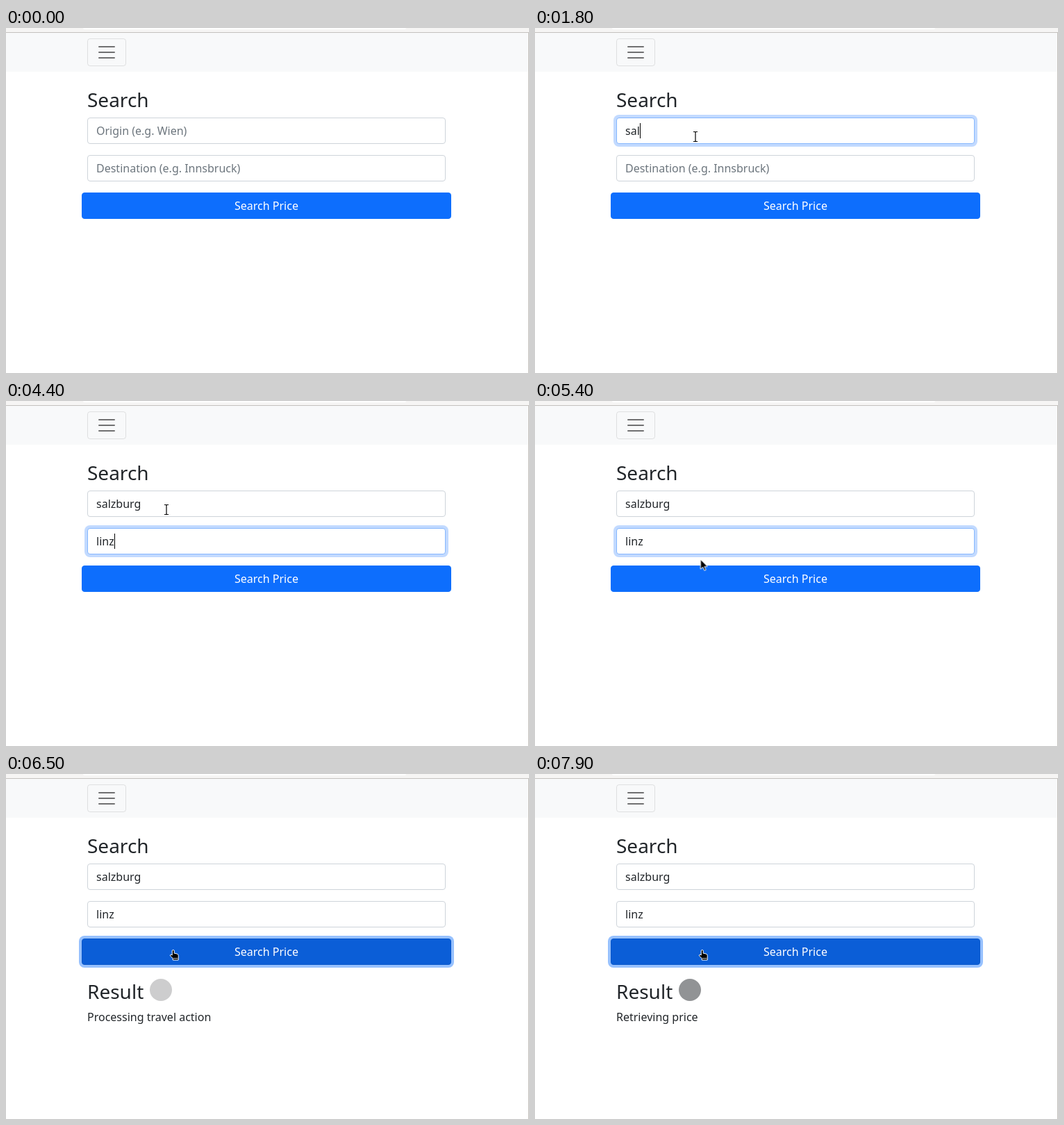
An HTML page that plays this animation: 753x497 px, repeating every 8 s.

```html
<!DOCTYPE html>
<html lang="en">
<head>
<meta charset="utf-8">
<title>Search</title>
<style>
html, body { margin: 0; width: 100%; height: 100%; overflow: hidden; background: #fff; }
body { position: relative; font: 16px/24px "Noto Sans", "Open Sans", sans-serif; color: #212529; }
body > * { position: absolute; box-sizing: border-box; white-space: pre; }

.toolbar { left: 0; top: 0; width: 100%; height: 7px; background: #f6f5f4; border-bottom: 1px solid #c3c0bd; }
.address { left: 111px; top: 0; width: 465px; height: 2px; background: #fff; border-radius: 0 0 4px 4px; }
.navbar { left: 0; top: 7px; width: 100%; height: 56px; background: #f8f9fa; }
.edge { left: 752px; top: 7px; width: 1px; bottom: 0; background: #c3c0bb; }
.toggler { left: 117px; top: 15px; width: 56px; height: 40px; padding: 4px 12px; border: 1px solid rgba(0,0,0,.1); border-radius: 4px; }
.toggler svg { display: block; }

h3 { left: 117px; margin: 0; font-size: 28px; font-weight: 500; line-height: 33.6px; }
.field { left: 117px; width: 516px; height: 38px; padding: 6px 12px; border: 1px solid #ced4da; border-radius: 4px; background: #fff; }
.hint { color: #6c757d; }
.caret { position: absolute; top: 7px; width: 1px; height: 22px; background: #000; }
#from { top: 129px; animation: from 8s ease-in-out infinite; }
#to { top: 183px; animation: to 8s ease-in-out infinite; }
.button { left: 109px; top: 237px; width: 532px; height: 38px; padding: 6px 12px; border: 1px solid #0d6efd; border-radius: 4px;
  background: #0d6efd; color: #fff; text-align: center; animation: press 8s ease-in-out infinite; }
#spinner { left: 207px; top: 295px; width: 32px; height: 32px; border-radius: 50%; background: #212529; }
#status { left: 117px; top: 338px; }
[hidden] { display: none; }

@keyframes from {
  0%, 13.19%, 41.31%, 100% { border-color: #ced4da; box-shadow: 0 0 0 0 rgba(13,110,253,0); }
  15.06%, 39.44% { border-color: #86b7fe; box-shadow: 0 0 0 4px rgba(13,110,253,.25); }
}
@keyframes to {
  0%, 39.44%, 73.13%, 100% { border-color: #ced4da; box-shadow: 0 0 0 0 rgba(13,110,253,0); }
  41.31%, 71.25% { border-color: #86b7fe; box-shadow: 0 0 0 4px rgba(13,110,253,.25); }
}
@keyframes press {
  0%, 68% { background: #0d6efd; border-color: #0d6efd; box-shadow: 0 0 0 0 rgba(49,132,253,0); }
  69.88%, 71.25% { background: #0b5ed7; border-color: #0a58ca; box-shadow: 0 0 0 0 rgba(49,132,253,0); }
  73.13%, 100% { background: #0b5ed7; border-color: #0a58ca; box-shadow: 0 0 0 4px rgba(49,132,253,.5); }
}

.mouse { left: 0; top: 0; width: 1px; height: 1px; overflow: visible; animation: move 8s infinite; }
.mouse g { visibility: hidden; animation: 8s step-end infinite; }
.mouse .hand { animation-name: hand; }
.mouse .arrow { animation-name: arrow; }
.mouse .beam { animation-name: beam; }
@keyframes move {
  0%, 6.3% { transform: translate(149px, 50px); animation-timing-function: ease-out; }
  8.7%, 11% { transform: translate(227px, 162px); animation-timing-function: ease-in-out; }
  13.1%, 61.9% { transform: translate(231px, 156px); animation-timing-function: ease-in-out; }
  70.6%, 100% { transform: translate(241px, 254px); }
}
@keyframes hand {
  0% { visibility: hidden; }
  6.2% { visibility: visible; }
  6.4% { visibility: hidden; }
  68% { visibility: visible; }
}
@keyframes arrow {
  0% { visibility: hidden; }
  6.4% { visibility: visible; }
  7.4% { visibility: hidden; }
  64.1% { visibility: visible; }
  65.2% { visibility: hidden; }
  67.1% { visibility: visible; }
  68% { visibility: hidden; }
}
@keyframes beam {
  0% { visibility: hidden; }
  7.4% { visibility: visible; }
  64.1% { visibility: hidden; }
  65.2% { visibility: visible; }
  67.1% { visibility: hidden; }
}
</style>
</head>
<body>
<div class="toolbar"></div>
<div class="address"></div>
<div class="navbar"></div>
<div class="toggler"><svg width="30" height="30"><path d="M4 7h22M4 15h22M4 23h22" stroke="#000" stroke-opacity=".55" stroke-width="2" stroke-linecap="round"/></svg></div>
<div class="edge"></div>

<h3 style="top:87px">Search</h3>
<div class="field" id="from"><span class="text"></span><i class="caret" hidden></i><span class="hint">Origin (e.g. Wien)</span></div>
<div class="field" id="to"><span class="text"></span><i class="caret" hidden></i><span class="hint">Destination (e.g. Innsbruck)</span></div>
<div class="button">Search Price</div>

<h3 class="result" style="top:297px" hidden>Result</h3>
<div class="result" id="spinner" hidden></div>
<div class="result" id="status" hidden></div>

<svg class="mouse">
  <g class="hand">
    <path d="M-1.8 7V1Q-1.8-.6-.3-.6T1.2 1V4.2L5.2 5Q7.2 5.5 7.2 7.5V14H-.8V11.5L-4.6 8Q-5 6.2-3.2 6.2Z" fill="#000" stroke="#fff"/>
    <path d="M0 11.5H6.5" stroke="#fff" stroke-width=".7"/>
  </g>
  <g class="arrow"><path d="M0 0V14L3.3 11 5.6 16 7.8 15 5.6 10.2H10Z" fill="#000" stroke="#fff"/></g>
  <g class="beam" fill="none">
    <path id="bar" d="M-3-6.5H-1Q0-6.5 0-5.5V6.5Q0 7.5-1 7.5H-3M3-6.5H1Q0-6.5 0-5.5M0 6.5Q0 7.5 1 7.5H3" stroke="#fff" stroke-width="3"/>
    <use href="#bar"/>
    <path d="M-3-6.5H-1Q0-6.5 0-5.5V6.5Q0 7.5-1 7.5H-3M3-6.5H1Q0-6.5 0-5.5M0 6.5Q0 7.5 1 7.5H3" stroke="#000" stroke-width="1.2"/>
  </g>
</svg>

<script>
const LOOP = 8000;
const RESULT_AT = 5836;
const GROW = 375;

const fields = [
  { id: 'from', word: 'salzburg', keys: [1500, 1700, 1800, 2100, 2300, 2600, 2800, 3000], focus: [[1055, 3155]] },
  { id: 'to', word: 'linz', keys: [3700, 3900, 4100, 4400], focus: [[3155, 4980], [5520, 5700]] }
];
const messages = [[0, 'Processing travel action'], [6690, 'Processing connection'], [7200, 'Retrieving price']];

const spinner = document.getElementById('spinner');
const statusLine = document.getElementById('status');
const results = document.querySelectorAll('.result');
for (const f of fields) {
  const box = document.getElementById(f.id);
  f.text = box.querySelector('.text');
  f.caret = box.querySelector('.caret');
  f.hint = box.querySelector('.hint');
}

function setText(el, value) {
  if (el.textContent !== value) el.textContent = value;
}

function render(t) {
  for (const f of fields) {
    const typed = f.keys.filter(k => t >= k - 10).length;
    setText(f.text, f.word.slice(0, typed));
    f.hint.hidden = typed > 0;
    f.caret.hidden = !f.focus.some(([on, off]) => t >= on && t < off);
  }
  results.forEach(el => { el.hidden = t < RESULT_AT; });
  setText(statusLine, messages.filter(m => t >= m[0]).pop()[1]);

  // The dot grows while fading in, then fades out at full size.
  const phase = Math.max(0, t - RESULT_AT) % (2 * GROW) / GROW;
  spinner.style.opacity = phase < 1 ? phase : 2 - phase;
  spinner.style.transform = `scale(${Math.min(1, phase)})`;
}

let start;
function tick(now) {
  start ??= now;
  render((now - start) % LOOP);
  requestAnimationFrame(tick);
}
render(0);
requestAnimationFrame(tick);
</script>
</body>
</html>
```
